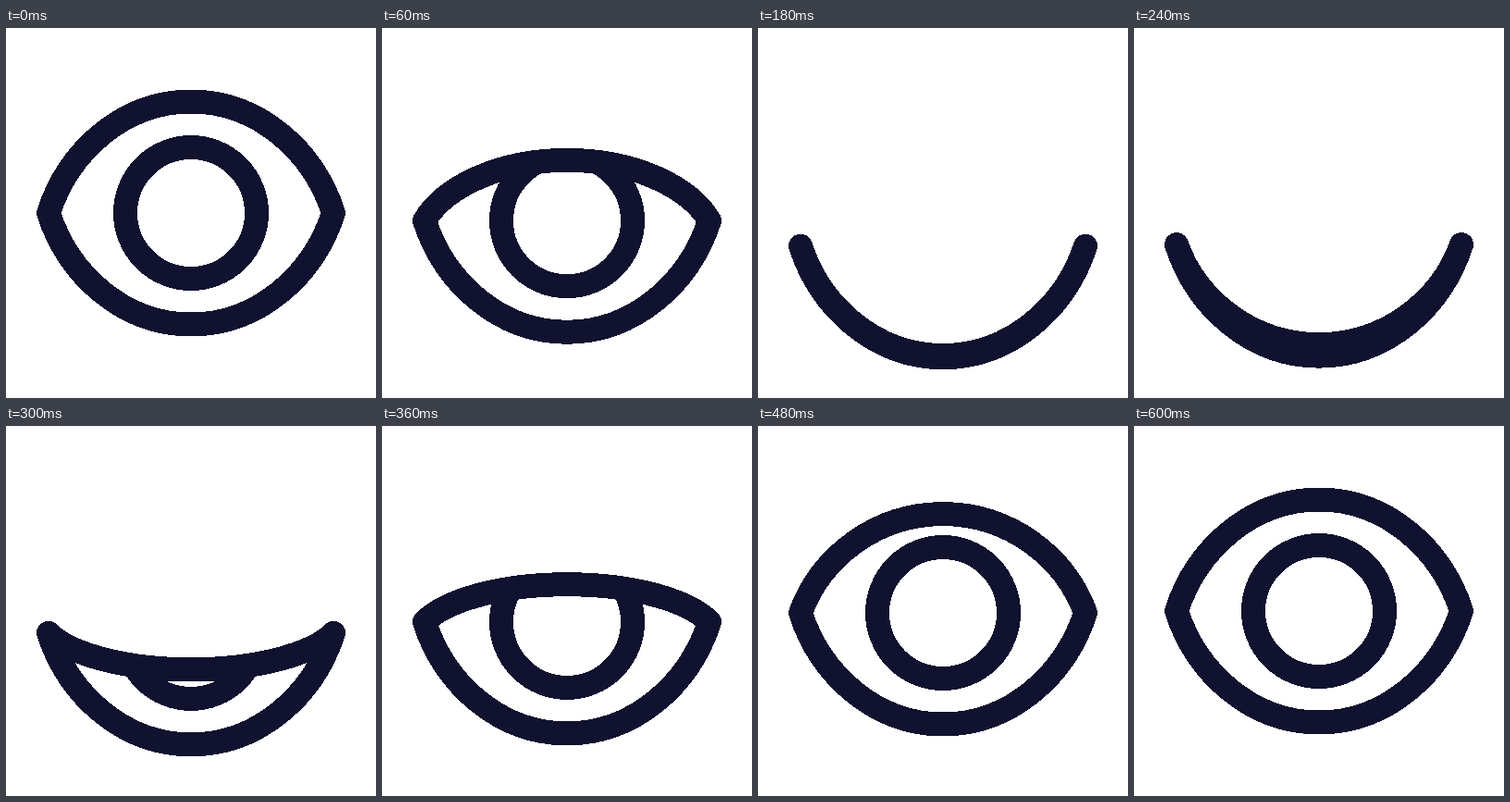
An HTML page that plays this animation: 400 px wide and 400 px high, repeating every 2630 ms.

```html
<!DOCTYPE html>
<html>
<head>
<meta charset="utf-8">
<title>Blinking eye</title>
<style>
  html, body { margin: 0; width: 100%; height: 100%; overflow: hidden; background: #fff; }
  svg { display: block; }
</style>
</head>
<body>
<svg width="400" height="400" viewBox="0 0 400 400" shape-rendering="crispEdges">
  <clipPath id="opening"><path class="lids"/></clipPath>
  <g id="eye" fill="none" stroke="#11122f" stroke-width="26" stroke-linejoin="round">
    <circle r="71" clip-path="url(#opening)"/>
    <path class="lids"/>
  </g>
</svg>
<script>
const eye = document.getElementById('eye');
const lids = document.querySelectorAll('.lids');
const LOOP = 2630, STEP = 30, CLOSED = 190, OPEN = 600;
const HEIGHT = 120.5, DROP = 36;

// Cubic bezier easing with control points (a, 0) and (b, 1)
function ease(x, a, b) {
  let lo = 0, hi = 1;
  for (let i = 0; i < 30; i++) {
    const s = (lo + hi) / 2, r = 1 - s;
    if (3 * r * r * s * a + 3 * r * s * s * b + s ** 3 < x) lo = s;
    else hi = s;
  }
  return lo * lo * (3 - 2 * lo);
}

// 0 = open, 1 = shut
function blink(t) {
  if (t >= OPEN) return 0;
  return t < CLOSED
    ? ease(t / CLOSED, 0.338, 0.685)
    : 1 - ease((t - CLOSED) / (OPEN - CLOSED), 0.357, 0.194);
}

// Curve from one corner (side = -1 or 1) to the other, with its apex at height h
function lid(side, h) {
  const shoulder = h * 0.566;
  return `C${side * 132} ${shoulder} ${side * 72} ${h} 0 ${h}` +
    `C${-side * 72} ${h} ${-side * 132} ${shoulder} ${-side * 154} 0`;
}

function draw(t) {
  const p = blink(t);
  const d = `M-154 0${lid(-1, HEIGHT * (2 * p - 1))}${lid(1, HEIGHT)}Z`;
  lids.forEach(path => path.setAttribute('d', d));
  eye.setAttribute('transform', `translate(200 ${200 + DROP * p})`);
}

const start = performance.now();
function tick() {
  const t = (performance.now() - start) % LOOP;
  draw(Math.floor(t / STEP) * STEP);
  requestAnimationFrame(tick);
}
tick();
</script>
</body>
</html>
```
